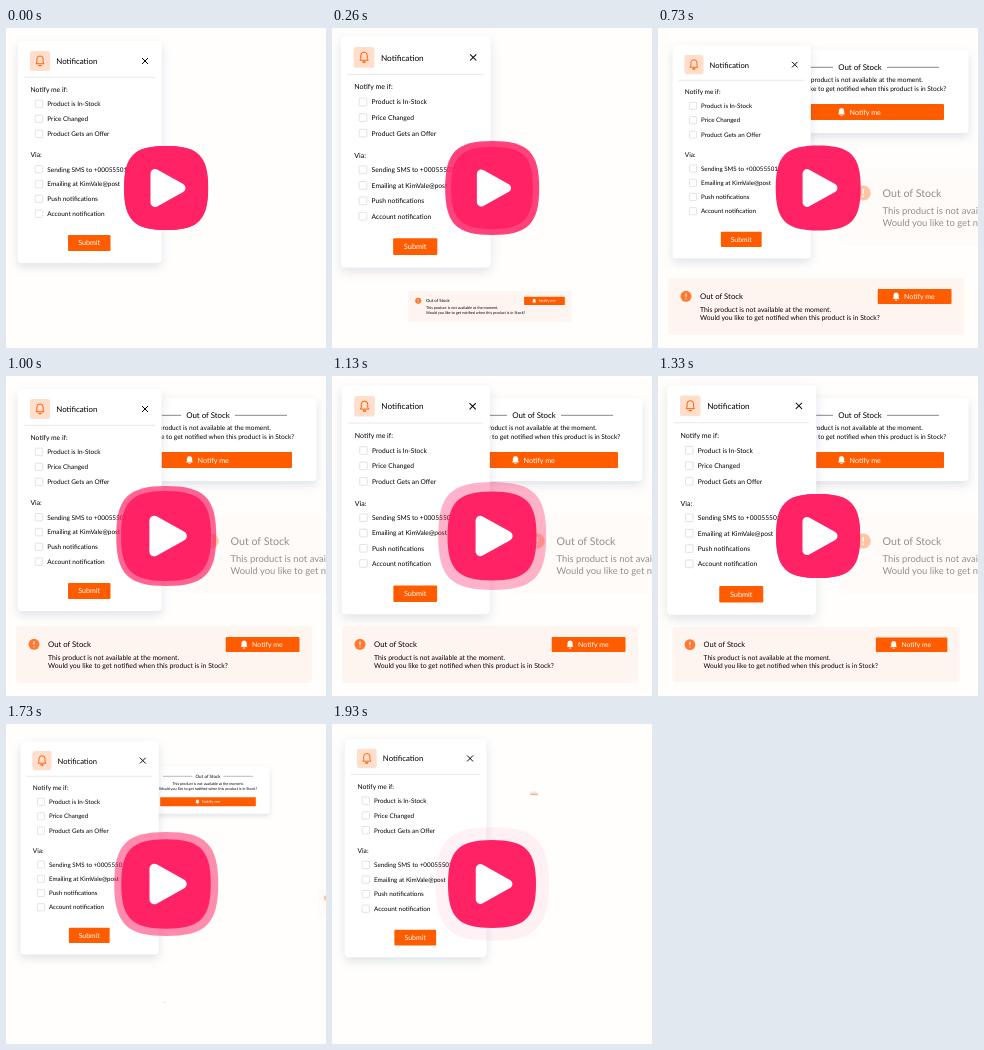
An HTML page that plays this animation: 320 px wide and 320 px high, repeating every 2 s.

```html
<!DOCTYPE html>
<html lang="en">
<head>
<meta charset="utf-8">
<title>Stock notification</title>
<style>
  html, body { margin: 0; width: 100%; height: 100%; overflow: hidden; background: #fffefc; }
  svg { display: block; width: 100vw; height: 100vh; }
  text { font-family: Lato, "Open Sans", sans-serif; text-rendering: geometricPrecision; white-space: pre; }
  .shadow { filter: drop-shadow(0 4px 5px rgba(50, 70, 120, .15)); }
</style>
</head>
<body>
<svg id="stage" viewBox="0 0 320 320"></svg>
<script>
const LOOP = 2000, STEPS = 30;
const ORANGE = '#ff5c00', PINK = '#ff2366', INK = '#000';

// ---- drawing helpers ----
const rect = (x, y, w, h, r, fill, more = '') =>
  `<rect x="${x}" y="${y}" width="${w}" height="${h}" rx="${r}" fill="${fill}" ${more}/>`;

// y is the middle of the line of text
const label = (x, y, size, str, fill = INK, anchor = 'start') =>
  `<text x="${x}" y="${y + size * .35}" font-size="${size}" fill="${fill}" text-anchor="${anchor}">${str}</text>`;

const line = (x1, x2, y, stroke, width) =>
  `<path d="M${x1} ${y}H${x2}" stroke="${stroke}" stroke-width="${width}"/>`;

const bell = (x, y, scale, paint) =>
  `<g transform="translate(${x} ${y}) scale(${scale})" ${paint}>
    <path d="M-3.8 2.8H3.8L3 1.2V-1.6A3 3 0 0 0-3-1.6V1.2Z"/><path d="M-1.3 4.4H1.3V4.6H-1.3Z"/></g>`;

const alertIcon = (x, y) =>
  `<circle cx="${x}" cy="${y}" r="5.5" fill="#ff7a30"/>
  <path d="M${x} ${y - 2.9}v3.4m0 1.4v1.1" stroke="#fff" stroke-width="1.1"/>`;

const notify = (x, y, w, h, size) => {
  const mid = y + h / 2, left = x + w / 2 - 10.5;
  return rect(x, y, w, h, 1, ORANGE) +
    bell(left - 8, mid, .8, 'fill="#fff" stroke="#fff" stroke-width=".5"') +
    label(left, mid, size, 'Notify me', '#fff');
};

const LINES = [
  'This product is not available at the moment.',
  'Would you like to get notified when this product is in Stock?'
];

// ---- parts ----
const banner = fill => `<g transform="translate(-158 -278.5)">
  ${rect(10, 250, 296, 57, 4, fill)}
  ${alertIcon(28, 268.3)}
  ${label(42, 268.3, 7.75, 'Out of Stock')}
  ${label(42, 281.3, 6.85, LINES[0])}
  ${label(42, 290, 6.85, LINES[1])}
  ${notify(219.7, 261, 73.8, 15, 7)}
</g>`;

const popup = () => `<g transform="translate(-202 -69.5)">
  ${rect(93, 22, 217.5, 83, 4, '#fff', 'class="shadow"')}
  ${line(123, 175, 39.3, '#333', .6)}${line(229, 281, 39.3, '#333', .6)}
  ${label(202, 39.3, 7.9, 'Out of Stock', INK, 'middle')}
  ${label(202, 51.8, 6.57, LINES[0], INK, 'middle')}
  ${label(202, 60.5, 6.57, LINES[1], INK, 'middle')}
  ${notify(118, 76, 168, 16, 7.2)}
</g>`;

const option = ([y, str]) =>
  rect(29.3, y - 3.8, 7.4, 7.4, .8, '#fff', 'stroke="#dcdcdc" stroke-width=".8"') +
  label(41.3, y, 6.45, str);

const form = () => `<g transform="translate(-83.5 -124)">
  ${rect(11.7, 13, 144, 222, 4, '#fff', 'class="shadow"')}
  ${rect(24, 23, 20, 20, 2.5, '#ffdfcc')}
  ${bell(34, 32.8, 1.05, `fill="none" stroke="${ORANGE}" stroke-width=".9" stroke-linejoin="round"`)}
  ${label(50.3, 33.3, 7.9, 'Notification')}
  <path d="M136 30l6 6m0-6l-6 6" stroke="${INK}" stroke-width="1"/>
  ${line(18, 149, 49.3, '#e4e4e4', .8)}
  ${label(24.5, 61.5, 6.8, 'Notify me if:')}
  ${label(24.5, 127, 6.8, 'Via:')}
  ${[
    [76, 'Product is In-Stock'],
    [91, 'Price Changed'],
    [106, 'Product Gets an Offer'],
    [141.3, 'Sending SMS to +000555014'],
    [156.2, 'Emailing at KimVale@post'],
    [171, 'Push notifications'],
    [185.8, 'Account notification']
  ].map(option).join('')}
  ${rect(62, 207, 42.5, 16, 1, ORANGE)}
  ${label(83.2, 215, 7.1, 'Submit', '#fff', 'middle')}
</g>`;

// rounded blob, 84 units across
const blob = `<path fill="${PINK}"
  d="M-42 0C-42-32-32-42 0-42S42-32 42 0 32 42 0 42-42 32-42 0Z"/>`;

const play = () => blob +
  `<path d="M-11-14.5L15-0L-11 14.5Z" fill="#fff" stroke="#fff" stroke-width="9" stroke-linejoin="round"/>`;

const part = (id, body) => `<g id="${id}">${body}</g>`;
const stage = document.getElementById('stage');
stage.innerHTML =
  part('side', banner('#fff9f6')) + part('popup', popup()) + part('bottom', banner('#fff5f0')) +
  part('form', form()) + part('halo', blob) + part('play', play());
const el = id => document.getElementById(id);
el('side').setAttribute('opacity', .43);

// ---- motion ----
const ease = p => (1 - Math.cos(Math.PI * Math.min(1, Math.max(0, p)))) / 2;

// grows at `start`, shrinks away at `end`
const showing = (t, start, inTime, end, outTime) =>
  ease((t - start) / inTime) * (1 - ease((t - end) / outTime));

const place = (id, x, y, scale) =>
  el(id).setAttribute('transform', `translate(${x} ${y}) scale(${scale})`);

// linear lookup in [position, value] pairs
const track = (keys, p) => {
  const i = Math.max(1, keys.findIndex(k => k[0] >= p));
  const [a, b] = [keys[i - 1], keys[i]];
  return a[1] + (b[1] - a[1]) * (p - a[0]) / (b[0] - a[0]);
};
const BUTTON = [[0, 84], [.4, 82], [.5, 90], [.9, 88], [1, 84]];
const HALO = [[0, 84], [.2, 86], [.4, 94], [.5, 100], [.8, 112], [1, 115]];
const FADE = [[0, 1], [.2, 1], [.4, .86], [.5, .7], [.8, .17], [.9, .06], [1, 0]];

function draw(t) {
  place('bottom', 158, 278.5, showing(t, 0, 500, 1278, 495));
  place('popup', 202, 69.5, showing(t, 262, 450, 1510, 490));
  place('side', 384, 179, 1.375 * showing(t, 173, 500, 1437, 500));
  place('form', 83.5, 124, 1 + .04 * Math.sin(2 * Math.PI * t / 1000));

  const beat = (t * 3 / LOOP) % 1;
  place('halo', 160.2, 160, track(HALO, beat) / 84);
  el('halo').setAttribute('opacity', track(FADE, beat));
  place('play', 160, 160, track(BUTTON, beat) / 84);
}

// the picture advances 15 times a second
const begin = performance.now();
function tick() {
  const step = Math.floor((performance.now() - begin + 7) * STEPS / LOOP) % STEPS;
  draw(step * LOOP / STEPS);
  requestAnimationFrame(tick);
}
tick();
</script>
</body>
</html>
```
